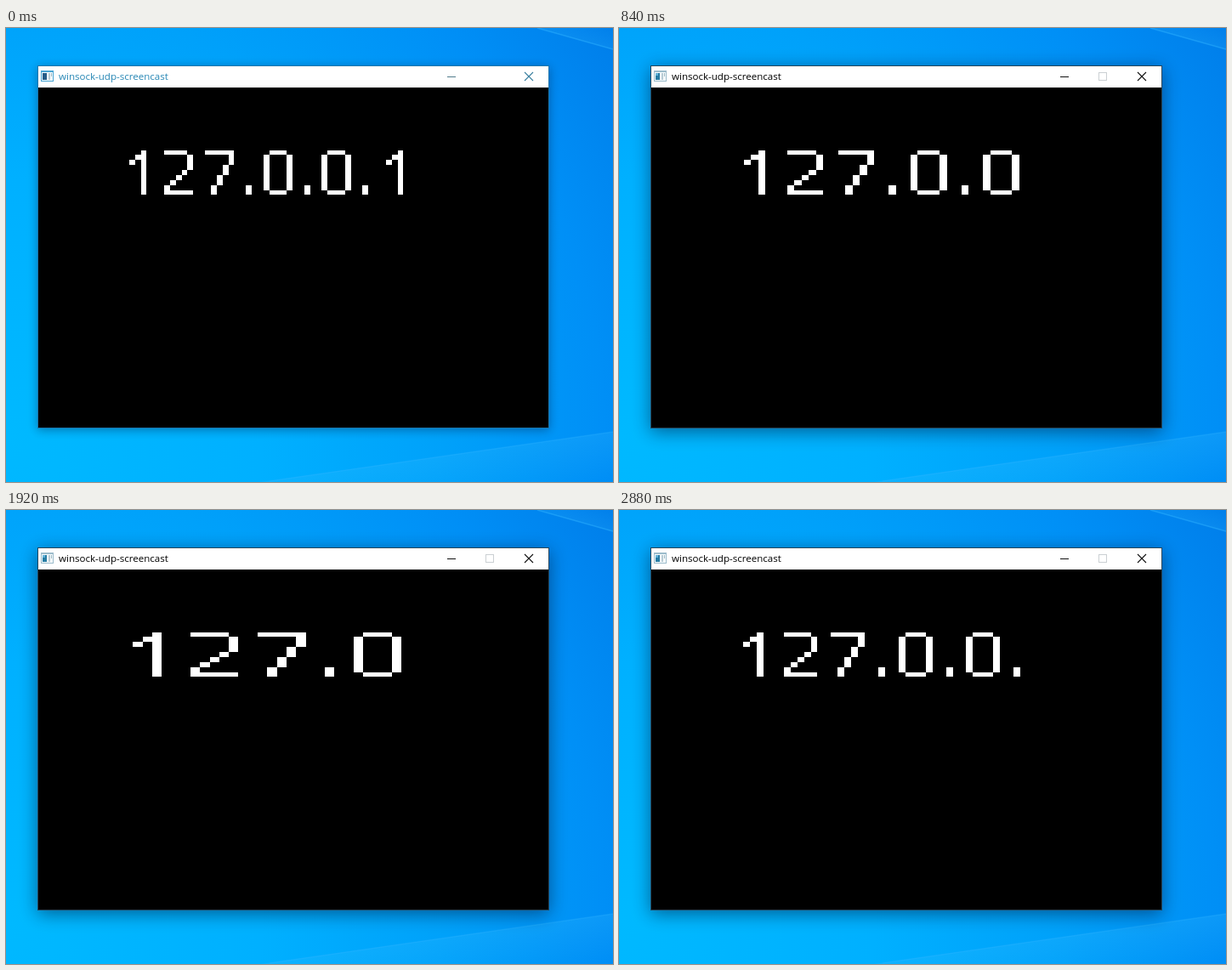
An HTML page with a canvas that plays this animation: 714x534 px, repeating every 3 s.

```html
<!DOCTYPE html>
<html lang="en">
<head>
<meta charset="utf-8">
<style>
html, body { margin: 0; width: 100%; height: 100%; overflow: hidden; background: #00a0f8; }
canvas { display: block; }
</style>
</head>
<body>
<canvas id="stage" width="714" height="534"></canvas>
<script>
const ctx = document.getElementById('stage').getContext('2d');
const W = 714, H = 534, LOOP = 3000;
const win = { x: 38, y: 45, w: 600, h: 425, bar: 25 };

// Start time and text of each step of the deleting and retyping
const steps = [
  [0, '127.0.0.1'], [480, '127.0.0.'], [720, '127.0.0'], [960, '127.0.'],
  [1200, '127.0'], [2160, '127.0.'], [2400, '127.0.0'], [2640, '127.0.0.']
];

const glyphs = {
  '0': { advance: 7, rows: ['.###', '#...#', '#...#', '#...#', '#...#', '#...#', '#...#', '#...#', '.###'] },
  '1': { advance: 7, rows: ['...#', '..##', '.#.#', '...#', '...#', '...#', '...#', '...#', '...#'] },
  '2': { advance: 7, rows: ['####', '....#', '....#', '....#', '...#', '..#', '.#', '#', '#####'] },
  '7': { advance: 7, rows: ['#####', '....#', '....#', '...#', '...#', '..#', '..#', '.#', '.#'] },
  '.': { advance: 3, rows: ['', '', '', '', '', '', '', '#', '#'] }
};

function rect(color, x, y, w, h) {
  ctx.fillStyle = color;
  ctx.fillRect(x, y, w, h);
}

function line(color, width, ...points) {
  ctx.strokeStyle = color;
  ctx.lineWidth = width;
  ctx.beginPath();
  for (let i = 0; i < points.length; i += 4) {
    ctx.moveTo(points[i], points[i + 1]);
    ctx.lineTo(points[i + 2], points[i + 3]);
  }
  ctx.stroke();
}

function beam(points, gradientEnds, alpha) {
  const light = ctx.createLinearGradient(...gradientEnds);
  light.addColorStop(0, `rgba(60,190,255,${alpha})`);
  light.addColorStop(1, 'rgba(60,190,255,0)');
  ctx.fillStyle = light;
  ctx.beginPath();
  points.forEach(([x, y]) => ctx.lineTo(x, y));
  ctx.fill();
}

function drawDesktop() {
  const sky = ctx.createRadialGradient(0, 480, 0, 0, 480, 860);
  sky.addColorStop(0, '#00b9ff');
  sky.addColorStop(0.35, '#00b0ff');
  sky.addColorStop(0.6, '#00a1fa');
  sky.addColorStop(0.82, '#008ff6');
  sky.addColorStop(1, '#007eea');
  rect(sky, 0, 0, W, H);
  beam([[300, 534], [714, 475], [714, 534]], [500, 504, 508, 560], 0.22);
  beam([[625, 0], [714, 25], [714, 0]], [672, 13, 680, -15], 0.15);
  line('rgba(50,180,255,.45)', 1.5, 625, 0, 714, 25);
  line('rgba(50,180,255,.28)', 1.5, 310, 533, 714, 475);
}

function drawIcon(active) {
  rect(active ? '#9cbccb' : '#4aa5d3', 41, 50, 15, 13);
  rect('#f4fafc', 42, 52, 13, 10);
  rect(active ? '#287da4' : '#285d88', 43, 53, 5, 8);
  if (active) rect('#62b2d8', 43, 53, 3, 3);
  rect('#b9ccd5', 50, 53, 2, 8);
  rect('#9eb7c3', 53, 53, 1, 4);
}

function drawWindow(active) {
  const { x, y, w, h, bar } = win;
  ctx.save();
  ctx.shadowColor = active ? 'rgba(0,25,60,.55)' : 'rgba(0,25,60,.4)';
  ctx.shadowBlur = active ? 20 : 11;
  ctx.shadowOffsetY = active ? 4 : 2;
  rect(active ? '#25475d' : '#1b76ac', x - 1, y - 1, w + 2, h + 2);
  ctx.restore();
  rect('#fff', x, y, w, bar);
  rect('#000', x, y + bar, w, h - bar);
  drawIcon(active);

  const ink = active ? '#000' : '#2787b5';
  ctx.fillStyle = ink;
  ctx.font = '11.55px "Open Sans", "Noto Sans", sans-serif';
  ctx.fillText('winsock-udp-screencast', 62, 61);
  rect(active ? '#111' : '#527c8c', 519, 57, 10, 1);
  if (active) {
    ctx.strokeStyle = '#cbd0d3';
    ctx.lineWidth = 1;
    ctx.strokeRect(564.5, 52.5, 9, 9);
  }
  line(active ? '#111' : '#397f9f', 1.1, 610, 52, 620, 62, 620, 52, 610, 62);
}

// The bitmap text is always stretched over the same width.
function drawAddress(text) {
  const units = [...text].reduce((sum, c) => sum + glyphs[c].advance, 0);
  const edgeX = col => Math.round(138 + col * 350 / units);
  const edgeY = row => Math.round(143.63 + row * 5.86);
  let pen = 0;
  for (const c of text) {
    glyphs[c].rows.forEach((cells, row) => {
      [...cells].forEach((cell, i) => {
        if (cell !== '#') return;
        const x = edgeX(pen + i), y = edgeY(row);
        rect('#fff', x, y, edgeX(pen + i + 1) - x, edgeY(row + 1) - y);
      });
    });
    pen += glyphs[c].advance;
  }
}

function draw() {
  const time = performance.now() % LOOP;
  drawDesktop();
  drawWindow(time >= 120);
  drawAddress(steps.filter(([start]) => start <= time).pop()[1]);
  requestAnimationFrame(draw);
}

draw();
</script>
</body>
</html>
```
